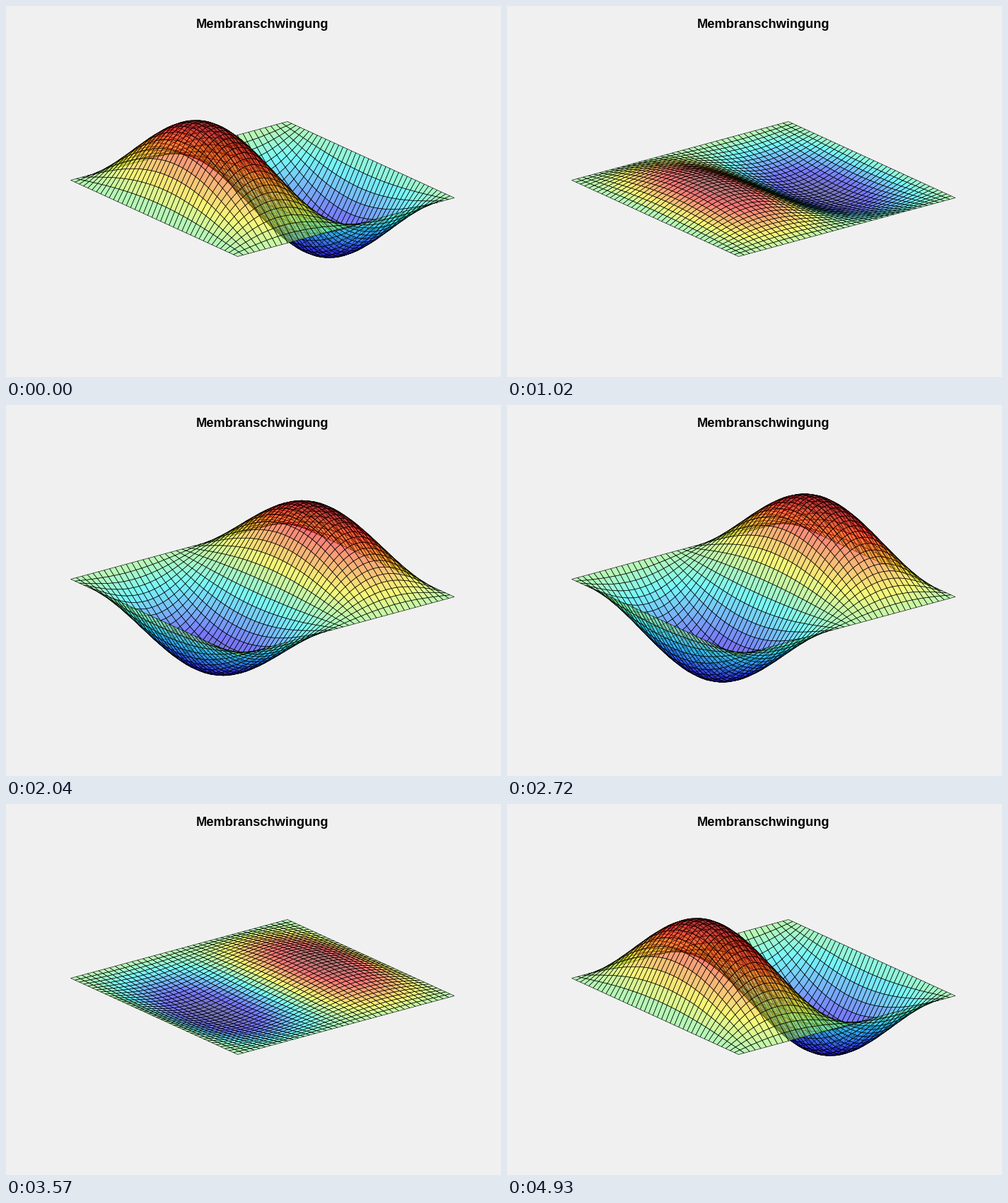
A matplotlib script for the animation above (5100 ms loop, 700 by 525 pixels).

```python
import numpy as np
import matplotlib.pyplot as plt
from matplotlib.animation import FuncAnimation
from matplotlib.collections import PolyCollection

W, H, DPI = 700, 525, 100
PX = 72 / DPI                       # points per pixel
FRAMES, INTERVAL = 30, 170
POINTS = 40

# Orthographic view: screen position of one corner and the two edges from it
CORNER = np.array([91.5, 246.5])
EDGE_U = np.array([236.0, 108.0])
EDGE_V = np.array([306.5, -83.0])
HEIGHT = 112.0                      # screen height of the full deflection
NEAR_U, NEAR_V, NEAR_Z = 287.0, -221.0, 42.0

grid = np.linspace(0, 1, POINTS)
u, v = np.meshgrid(grid, grid, indexing="ij")
mode = np.sin(np.pi * u) * np.sin(2 * np.pi * v)


def jet(t):
    channels = [np.clip(1.5 - np.abs(4 * t - c), 0, 1) for c in (3, 2, 1)]
    return np.stack(channels, axis=-1)


def cell_corners(a):
    """Stack the four corner values of every grid cell."""
    return np.stack([a[:-1, :-1], a[1:, :-1], a[1:, 1:], a[:-1, 1:]], axis=2)


def surface(k):
    """Cell outlines and colours at step k, sorted from back to front."""
    z = np.cos(2 * np.pi * k / (FRAMES - 1)) * mode
    x = CORNER[0] + EDGE_U[0] * u + EDGE_V[0] * v
    y = CORNER[1] + EDGE_U[1] * u + EDGE_V[1] * v - HEIGHT * z
    near = cell_corners(NEAR_U * u + NEAR_V * v + NEAR_Z * z).mean(axis=2)
    order = np.argsort(near.ravel())

    verts = np.stack([cell_corners(x), cell_corners(y)], axis=-1)
    level = (z - z.min()) / (z.max() - z.min())
    rgb = jet(level[:-1, :-1]).reshape(-1, 3)
    rgba = np.column_stack([rgb, np.full(len(rgb), 0.5)])
    return verts.reshape(-1, 4, 2)[order], rgba[order]


fig = plt.figure(figsize=(W / DPI, H / DPI), dpi=DPI, facecolor="#f0f0f0")
ax = fig.add_axes([0, 0, 1, 1])
ax.set_xlim(0, W)
ax.set_ylim(H, 0)
ax.axis("off")

ax.text(362.8, 31, "Membranschwingung", family="Liberation Sans",
        weight="bold", size=18.3 * PX, color="black",
        ha="center", va="baseline")

# Neighbouring cells both stroke their shared edge, so the stroke is thin
verts, colors = surface(0)
membrane = PolyCollection(verts, facecolors=colors, edgecolors="black",
                          linewidths=0.6 * PX, antialiaseds=True,
                          joinstyle="bevel")
ax.add_collection(membrane, autolim=False)


def update(k):
    verts, colors = surface(k)
    membrane.set_verts(verts)
    membrane.set_facecolor(colors)
    return [membrane]


anim = FuncAnimation(fig, update, frames=FRAMES, interval=INTERVAL,
                     repeat=True, repeat_delay=0, blit=False)
plt.show()
```
